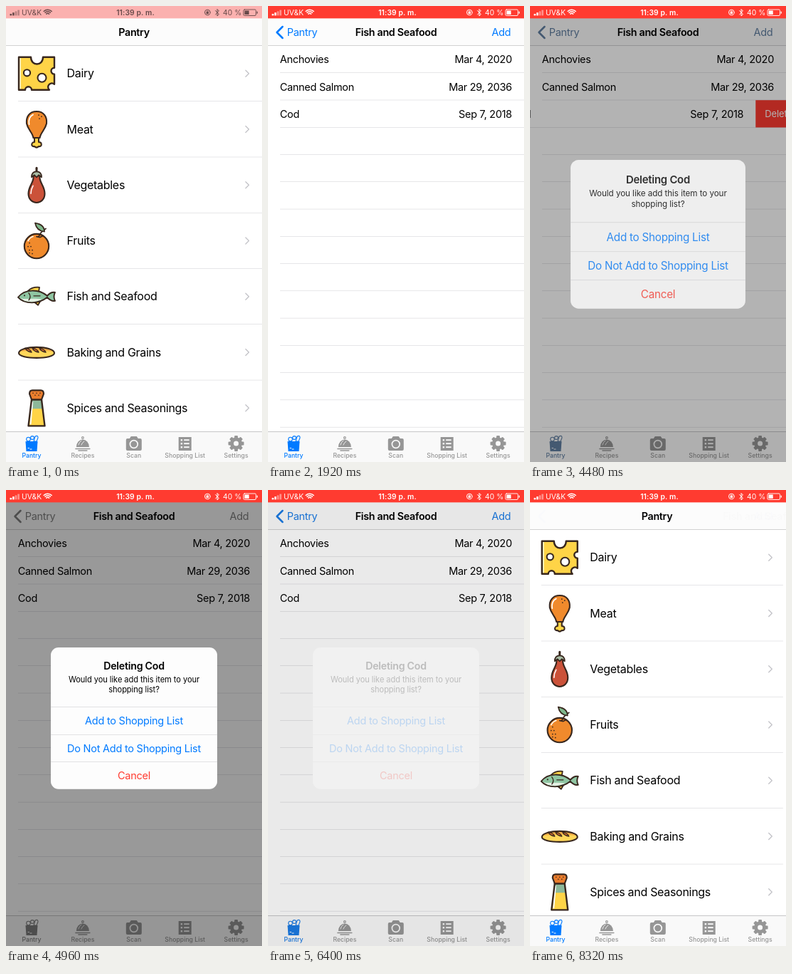
Write an HTML page with a canvas that moves like this. It is 360 px wide and 640 px high and loops after 8.48 s.

```html
<!DOCTYPE html>
<html lang="en">
<head>
<meta charset="utf-8">
<title>Pantry</title>
<style>
html, body { margin: 0; width: 100%; height: 100%; overflow: hidden; background: #fff; }
canvas { display: block; width: 360px; height: 640px; }
</style>
</head>
<body>
<canvas id="stage"></canvas>
<script>
const W = 360, H = 640, LOOP = 8480, STEP = 160;
const PT = W / 414;                       // one layout point in pixels
const STATUS = 20 * PT, NAV = 64 * PT, TAB = 597;
const ROW = 90 * PT, ITEM = 44 * PT, SWIPE = 69;
const BLUE = [0, 122, 255], GREY = [128, 128, 128];
const RED = '#ff3b30', LINK = '#007aff', INK = '#38271e', BAR = '#f9f9f9';

const dpr = window.devicePixelRatio || 1;
function makeLayer(canvas) {
  canvas.width = W * dpr;
  canvas.height = H * dpr;
  const context = canvas.getContext('2d');
  context.scale(dpr, dpr);
  return context;
}
const stage = makeLayer(document.getElementById('stage'));
const popup = makeLayer(document.createElement('canvas'));
let c = stage;

const clamp = v => Math.min(1, Math.max(0, v));
const span = (t, start, length) => clamp((t - start) / length);
const easeOut = (v, power) => 1 - (1 - v) ** power;
const smooth = v => v * v * (3 - 2 * v);
const mix = (a, b, v) => `rgb(${a.map((n, i) => Math.round(n + (b[i] - n) * v))})`;

function box(x, y, w, h, color) {
  c.fillStyle = color;
  c.fillRect(x, y, w, h);
}
// Thin rules keep their fractional position and so vary in strength.
const hairline = (x, y) => box(x, y - 0.4, W, 0.45, '#c8c7cc');
function rounded(x, y, w, h, r, color) {
  c.fillStyle = color;
  c.beginPath();
  c.roundRect(x, y, w, h, r);
  c.fill();
}
function shape(d, fill, stroke, width = 2.1) {
  const path = new Path2D(d);
  if (fill) { c.fillStyle = fill; c.fill(path); }
  if (stroke) {
    c.strokeStyle = stroke;
    c.lineWidth = width;
    c.lineCap = c.lineJoin = 'round';
    c.stroke(path);
  }
}
function disc(x, y, r, fill, stroke, width = 2.1) {
  c.beginPath();
  c.arc(x, y, r, 0, 7);
  if (fill) { c.fillStyle = fill; c.fill(); }
  if (stroke) { c.strokeStyle = stroke; c.lineWidth = width; c.stroke(); }
}
const dots = (points, r = 0.9) => points.forEach(([x, y]) => disc(x, y, r, INK));
function text(str, x, y, { size = 14.5, weight = 400, color = '#000', align = 'left', gap = -0.3 } = {}) {
  c.font = `${weight} ${size}px Inter, sans-serif`;
  c.letterSpacing = gap + 'px';
  c.textAlign = align;
  c.fillStyle = color;
  c.fillText(str, x, y);
}
function at(x, y, draw, alpha = 1) {
  c.save();
  c.translate(x, y);
  c.globalAlpha *= alpha;
  draw();
  c.restore();
}

const foods = [
  ['Dairy', () => {
    const slab = 'M-25-23H-8C-8-10 9-10 9-23H25V-8A4.5 4.5 0 0 0 25 1V15A5 5 0 0 0 18 23H-7A4.5 4.5 0 0 0-16 23H-25Z';
    shape(slab, '#ffd447');
    shape('M-23-21V21', null, '#fff3c4', 2);
    shape(slab, null, INK, 2.4);
    disc(-13.5, -1, 4.6, '#fff', INK);
    disc(7.5, 6, 6, '#fff', INK);
  }],
  ['Meat', () => {
    shape('M-3 9V18C-8 18-8 25-3 24Q0 27 3 24C8 25 8 18 3 18V9Z', '#ffd447', INK);
    shape('M0-25C10-25 15-18 14-8C12 1 6 4 4.5 12H-4.5C-6 4-12 1-14-8C-15-18-10-25 0-25Z', '#f08a2c', INK);
    shape('M-10.5-7Q-12-17-5-20.5', null, '#fff', 1.8);
    dots([[3, -20], [7, -18], [4, -15]]);
  }],
  ['Vegetables', () => {
    shape('M-4.5-13C-3-4-11.5 1-11.5 12C-11.5 29 11.5 29 11.5 12C11.5 1 3-4 4.5-13Z', '#cb5239', INK);
    shape('M-8 12Q-8 6-5 1', null, '#fff', 1.6);
    shape('M0-18V-24', null, INK, 3);
    shape('M-7-11Q-7-19 0-19Q7-19 7-11L3-14L0-11L-3-14Z', '#a9bda6', INK, 1.8);
  }],
  ['Fruits', () => {
    disc(0, 7.5, 17.2, '#f08a2c', INK);
    shape('M3-6Q6-13 13-17M0-6L5-5L9-7', null, INK, 1.8);
    shape('M11-13Q0-14-2-25Q11-23 11-13Z', '#7fb78c', INK, 1.8);
    shape('M-12 0Q-9-5-5-6', null, '#fff', 1.6);
    dots([[-10, 3], [-12, 8], [-8, 8], [-10, 13], [-6, 13], [-6, 18], [-10, 17]]);
  }],
  ['Fish and Seafood', () => {
    shape('M-12-8Q-6-14 4-13L3-7ZM-3 8L2 12L5 7Z', '#ffd447', INK, 1.8);
    const body = 'M-26 1C-17-11 3-11 15-1Q20-7 26-6Q23 0 26 6Q20 7 15 1C3 11-17 11-26 1Z';
    shape(body, '#8fc5a2');
    shape('M-25 2C-16 5-6 1 8 4Q-10 12-25 2Z', '#e3efe2');
    shape(body, null, INK, 1.9);
    shape('M-11-5Q-7 0-11 5M-4-1H5', null, INK, 1.4);
    dots([[-17, -1.5]], 1.1);
  }],
  ['Baking and Grains', () => {
    shape('M-25 1C-25-10 25-10 25 1C25 10-25 10-25 1Z', '#ffd75a');
    shape('M-24-1C-18-10 18-10 24-1Q0-4-24-1Z', '#f3ae45');
    shape('M-25 1C-25-10 25-10 25 1C25 10-25 10-25 1Z', null, INK);
    for (const x of [-12, -2, 8]) {
      shape(`M${x - 4}-6Q${x + 3}-5 ${x + 5} 0Q${x - 2}-1 ${x - 4}-6Z`, '#d9702f', INK, 1.4);
    }
  }],
  ['Spices and Seasonings', () => {
    const glass = 'M-7-12H7L11.5 25H-11.5Z';
    shape(glass, '#ffd447');
    shape('M-7-12H7L8.5 1H-8.5Z', '#8db89a');
    shape('M-6-8L-8.5 22', null, '#fff', 2);
    shape(glass, null, INK, 2.4);
    shape('M-10-20Q-10-25-6-25H6Q10-25 10-20L7-12H-7Z', '#ea7d2c', INK);
    dots([[-5, -21], [0, -21], [5, -21], [-2, -18], [3, -18]], 0.8);
  }],
];

const stock = [['Anchovies', 'Mar 4, 2020'], ['Canned Salmon', 'Mar 29, 2036'], ['Cod', 'Sep 7, 2018']];

const tabs = [
  ['Pantry', color => {
    disc(-4.5, -6, 2.8, BAR, color, 1.1);
    disc(1, -8, 2.4, BAR, color, 1.1);
    shape('M3-3L5-10Q9-12 9-8L7-3Z', BAR, color, 1.1);
    shape('M-8.5-3H8.5L7.5 11H-7.5Z', color);
    shape('M-5 6.5H-3.5M-2 8H0', null, '#fff', 1);
  }],
  ['Recipes', color => {
    disc(0, -8, 1.4, null, color, 1.1);
    shape('M-9 5A9 10.5 0 0 1 9 5Z', color);
    shape('M-10 7.5H10M-6 10H6', null, color, 1.4);
    shape('M-6 2Q-5-2-2-4M-2 2Q-1-1 2-3', null, BAR, 0.9);
  }],
  ['Scan', color => {
    shape('M-11-5Q-11-7-9-7H-6L-4-10H4L6-7H9Q11-7 11-5V8Q11 10 9 10H-9Q-11 10-11 8Z', color);
    disc(0, 1, 5.4, null, BAR, 1.7);
  }],
  ['Shopping List', color => {
    box(-9, -9, 18, 19, color);
    for (const y of [-5, 0, 5]) {
      box(-6, y - 1, 2.4, 2.4, BAR);
      box(-1.5, y - 0.8, 7.5, 1.9, BAR);
    }
  }],
  ['Settings', color => {
    for (let i = 0; i < 8; i++) {
      c.save();
      c.rotate(i * Math.PI / 4);
      rounded(-2.4, -11, 4.8, 6, 1, color);
      c.restore();
    }
    disc(0, 0, 6, null, color, 5);
  }],
];

function drawPantry(highlight) {
  box(0, 0, W, H, '#fff');
  foods.forEach(([name, icon], i) => {
    const top = NAV + ROW * i, mid = top + ROW / 2;
    if (i === 4 && highlight) {
      box(0, top, W, ROW, `rgba(217,217,217,${highlight})`);
    }
    at(43, mid, icon);
    text(name, 85.6, mid + 5.6, { size: 16 });
    shape(`M337 ${mid - 4.5}L341.5 ${mid}L337 ${mid + 4.5}`, null, '#c4c4c9', 1.4);
    hairline(17, top + ROW);
  });
}

function drawStock(offset) {
  box(0, 0, W, H, '#fff');
  for (let i = 0; i < 14; i++) {
    const top = NAV + ITEM * i, shift = i === 2 ? offset : 0;
    if (stock[i]) {
      const base = top + ITEM / 2 + 5.5;
      text(stock[i][0], 16.7 - shift, base);
      text(stock[i][1], 343 - shift, base, { align: 'right' });
    }
    hairline(shift ? 0 : 17, top + ITEM);
    if (shift) {
      box(W - shift, top, shift, ITEM, RED);
      const pad = 17 * (shift / SWIPE) ** 0.57;
      text('Delete', W - shift + pad, top + ITEM / 2 + 4.8, { size: 13, color: '#fff', gap: -0.1 });
    }
  }
}

function drawNav(p, tint) {
  box(0, 0, W, NAV, '#fcfcfc');
  box(0, NAV - 0.3, W, 0.6, '#b4b4b6');
  const title = { size: 14.3, weight: 600, align: 'center' };
  at(-131 * p, 0, () => text('Pantry', 180, 42, title), 1 - p);
  at(150 * (1 - p), 0, () => text('Fish and Seafood', 180, 42, title), p);
  at(131 * (1 - p), 0, () => text('Pantry', 26.7, 42, { color: tint }), p);
  at(0, 0, () => {
    shape('M20.5 29L12.5 37L20.5 45', null, tint, 2.5);
    text('Add', 341.4, 42, { color: tint, align: 'right' });
  }, p);
}

function drawTabs(tint) {
  box(0, TAB, W, H - TAB, BAR);
  box(0, TAB, W, 1, '#c6c6c8');
  tabs.forEach(([name, icon], i) => {
    const color = i ? '#969696' : tint, x = 36 + 71.9 * i;
    at(x, 614, () => icon(color));
    text(name, x, 633.5, { size: 8.7, weight: 500, color, align: 'center', gap: 0 });
  });
}

function drawStatus(faded) {
  const ink = faded ? '#684a4a' : '#fff';
  const label = { size: 10.3, color: ink, gap: 0.1 };
  box(0, 0, W, STATUS, faded ? '#fbb1af' : RED);
  for (let i = 0; i < 4; i++) {
    at(0, 0, () => box(5.5 + 3.6 * i, 11 - 1.8 * i, 2.6, 2.4 + 1.8 * i, ink), i < 2 ? 1 : 0.45);
  }
  text('UV&K', 22, 13, label);
  for (const r of [2.6, 5.2, 7.8]) {
    c.beginPath();
    c.arc(58.7, 13, r, -2.35, -0.79);
    c.strokeStyle = ink;
    c.lineWidth = 1.6;
    c.stroke();
  }
  text('11:39 p. m.', 182, 13, { ...label, weight: 600, align: 'center' });
  disc(283.3, 9, 3.8, null, ink, 1);
  box(281.6, 8.3, 3.4, 2.8, ink);
  disc(283.3, 8, 1.1, null, ink, 0.8);
  shape('M294.5 6.5L299.5 11.5L297 14V4.5L299.5 7L294.5 12', null, ink, 1);
  text('40 %', 305, 13, label);
  shape('M335.5 5H350Q351.5 5 351.5 6.5V12Q351.5 13.5 350 13.5H335.5Q334 13.5 334 12V6.5Q334 5 335.5 5Z', null, ink, 0.9);
  box(335.5, 6.5, 6.2, 5.5, ink);
  box(352.6, 7.7, 1.3, 3, ink);
}

function scaled(scale, draw) {
  c.save();
  c.translate(180, 320.4);
  c.scale(scale, scale);
  c.translate(-180, -320.4);
  draw();
  c.restore();
}

function drawPanel() {
  rounded(63, 221, 234, 198.7, 11, '#fdfdfd');
  for (const y of [304, 343, 381]) box(63, y, 234, 1, '#e2e2e4');
  const line = (str, y, style) => text(str, 180, y, { align: 'center', gap: -0.24, ...style });
  line('Deleting Cod', 252, { size: 14.2, weight: 600 });
  const message = { size: 11.1, gap: -0.06 };
  line('Would you like add this item to your', 269.5, message);
  line('shopping list?', 283.5, message);
  line('Add to Shopping List', 329.2, { color: LINK });
  line('Do Not Add to Shopping List', 367.6, { color: LINK });
  line('Cancel', 406, { color: RED });
}

function drawAlert(alpha, scale) {
  // The frosted backdrop hides the rules behind the panel.
  const frost = Math.round(255 * (1 - 0.32 * alpha));
  scaled(scale, () => rounded(63, 221, 234, 198.7, 11, `rgb(${frost},${frost},${frost})`));
  c = popup;
  c.clearRect(0, 0, W, H);
  scaled(scale, drawPanel);
  c = stage;
  c.globalAlpha = alpha;
  c.drawImage(popup.canvas, 0, 0, W, H);
  c.globalAlpha = 1;
}

function render(t) {
  const pushed = easeOut(span(t, 1120, 620), 3);
  const page = pushed - easeOut(span(t, 7840, 620), 3);
  const highlight = t < 2000 ? Number(t >= 1120) : page;
  const offset = SWIPE * (easeOut(span(t, 2480, 560), 3) - smooth(span(t, 4312, 400)));
  const shown = easeOut(span(t, 4300, 400), 2.3);
  const alert = shown - easeOut(span(t, 6230, 310), 2);
  const tint = mix(BLUE, GREY, alert);

  if (page < 1) {
    at(-108 * page, 0, () => drawPantry(highlight));
    if (page > 0) box(0, 0, W, H, `rgba(0,0,0,${0.1 * page})`);
  }
  if (page > 0) at(W * (1 - page), 0, () => drawStock(offset));
  drawNav(page, tint);
  drawTabs(tint);
  if (alert > 0) {
    box(0, 0, W, H, `rgba(0,0,0,${0.4 * alert})`);
    drawAlert(alert, 1.2 - 0.2 * shown);
  }
  drawStatus(t < STEP);
}

function tick() {
  const t = performance.now() % LOOP;
  render(Math.floor(t / STEP) * STEP);
  requestAnimationFrame(tick);
}
tick();
</script>
</body>
</html>
```
